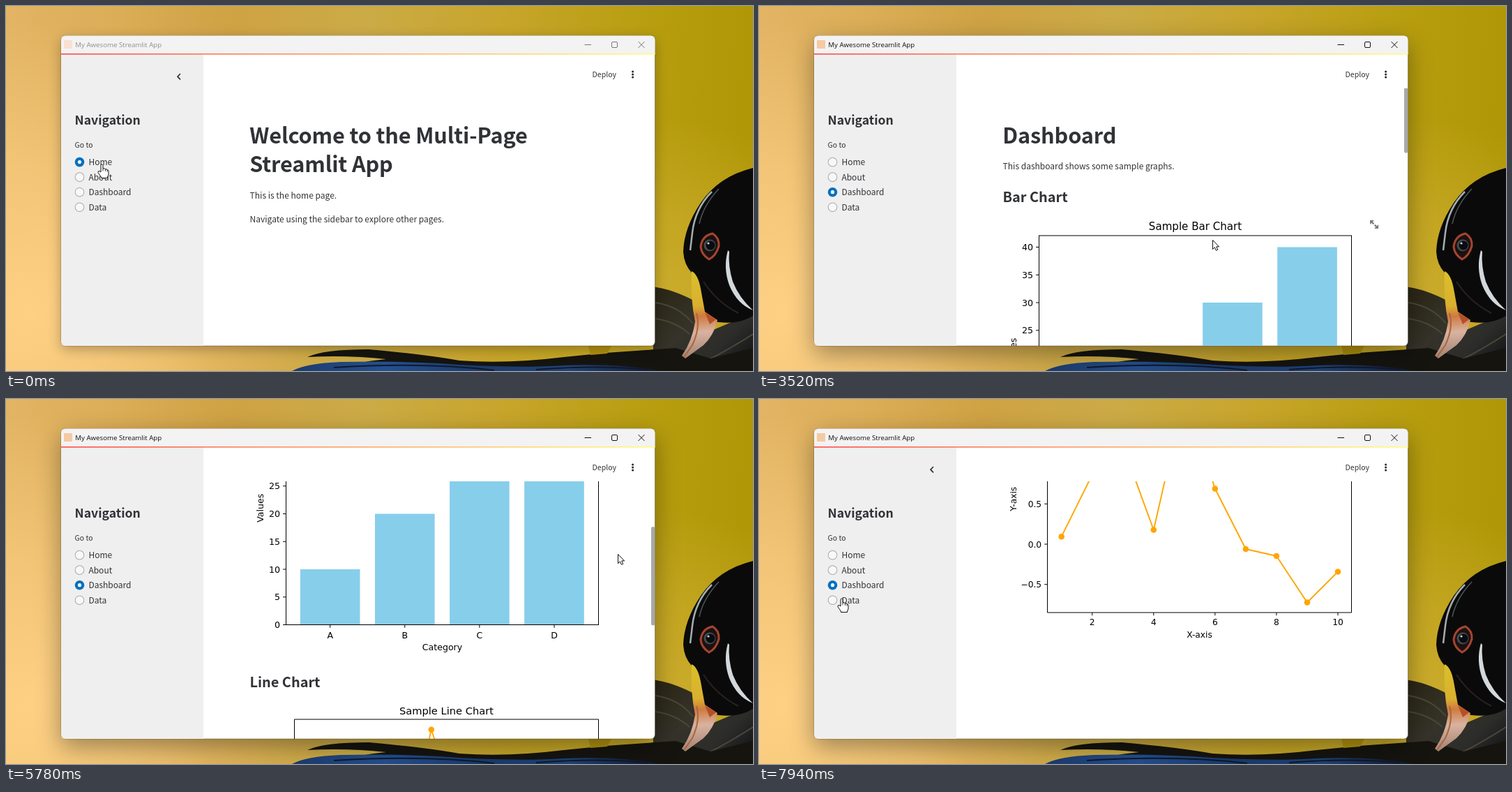
Write an HTML page with a canvas that moves like this. It is 1071 px wide and 523 px high and loops after 8000 ms.

```html
<!DOCTYPE html>
<html lang="en">
<head>
<meta charset="utf-8">
<title>Multi-page app</title>
<style>
  html, body { margin: 0; width: 100%; height: 100%; overflow: hidden; }
  canvas { display: block; }
</style>
</head>
<body>
<canvas id="stage" width="1071" height="523"></canvas>
<script>
const W = 1071, H = 523, LOOP = 8000;
const ctx = document.getElementById('stage').getContext('2d');
const UI = '"Noto Sans CJK JP", "Noto Sans CJK SC", "Noto Sans CJK", "Open Sans", sans-serif';
const PLOT = '"DejaVu Sans", sans-serif';
const INK = '#303236', BLUE = '#0070c0', SKY = '#87ceeb', ORANGE = '#ffa500';
const WIN = { x: 79, y: 42.5, w: 851.5, h: 444.5 };
const TOP = 69, SIDE = 283, VIEW = 118, BOTTOM = 487;

// [time, x, y] of the pointer tip
const POINTER = [
  [0, 138, 227], [330, 110, 219], [610, 132, 240], [1700, 132, 240],
  [1880, 140, 277], [2020, 140, 277], [2090, 141, 274], [2230, 141, 269],
  [3170, 141, 269], [3520, 650, 335], [3720, 650, 335], [4070, 658, 335],
  [4470, 856, 303], [4900, 925, 185], [5300, 930, 250], [5780, 877, 222],
  [6130, 877, 224], [6410, 878, 230], [7180, 878, 230], [7460, 122, 280],
  [7600, 122, 280], [7940, 119, 286]
];
// [time, offset]
const SCROLL = [[3660, 0], [4070, 239], [4400, 340], [5800, 340], [6410, 754], [6800, 818.5]];

const smooth = u => u * u * (3 - 2 * u);
const linear = u => u;

function track(keys, t, ease) {
  if (t <= keys[0][0]) return keys[0].slice(1);
  for (let i = 1; i < keys.length; i++) {
    const a = keys[i - 1], b = keys[i];
    if (t < b[0]) {
      const u = ease((t - a[0]) / (b[0] - a[0]));
      return a.slice(1).map((v, k) => v + (b[k + 1] - v) * u);
    }
  }
  return keys[keys.length - 1].slice(1);
}

function text(c, str, x, y, size, o = {}) {
  c.font = `${o.weight || 400} ${size}px ${o.family || UI}`;
  c.textAlign = o.align || 'left';
  c.textBaseline = 'alphabetic';
  c.letterSpacing = (o.spacing || 0) + 'px';
  c.fillStyle = o.color || INK;
  c.fillText(str, x, y);
}

function shape(c, d, fill, stroke, width = 1) {
  const p = new Path2D(d);
  if (fill) { c.fillStyle = fill; c.fill(p); }
  if (stroke) { c.strokeStyle = stroke; c.lineWidth = width; c.stroke(p); }
}

function disc(c, x, y, r, fill) {
  c.beginPath();
  c.arc(x, y, r, 0, 7);
  c.fillStyle = fill;
  c.fill();
}

function box(c, x, y, w, h, r) {
  c.beginPath();
  c.roundRect(x, y, w, h, r);
}

function gradient(c, x0, y0, x1, y1, stops) {
  const g = c.createLinearGradient(x0, y0, x1, y1);
  stops.forEach(([p, col]) => g.addColorStop(p, col));
  return g;
}

function glow(c, x, y, r, rgb, alpha) {
  const g = c.createRadialGradient(x, y, 0, x, y, r);
  g.addColorStop(0, `rgba(${rgb},${alpha})`);
  g.addColorStop(.5, `rgba(${rgb},${alpha * .6})`);
  g.addColorStop(1, `rgba(${rgb},0)`);
  c.fillStyle = g;
  c.fillRect(0, 0, W, H);
}

function drawDuck(c) {
  // back feathers
  shape(c, 'M925 402Q955 405 990 424L1000 470 1071 440V523H860L928 492Z',
    gradient(c, 930, 400, 1050, 523, [[0, '#2a2512'], [.45, '#35332a'], [.75, '#2c2c2a'], [1, '#141517']]));
  shape(c, 'M931 425Q965 430 985 455M931 448Q960 452 980 470M1005 508Q1040 490 1071 470',
    null, '#4a4738', 2);
  // tail and wing
  shape(c, 'M432 503Q455 492 520 492 600 499 650 508 720 513 800 503L860 497 960 490 1010 505 1071 490V523H470Q500 510 545 506 490 500 432 503Z', '#15140f');
  shape(c, 'M410 523Q430 512 480 510 570 508 650 514 740 519 800 515 880 512 940 523Z',
    gradient(c, 410, 0, 940, 0, [[0, '#1c3b6e'], [.25, '#24508f'], [.5, '#1a3a6c'], [.75, '#1e4276'], [1, '#10182a']]));
  shape(c, 'M470 518Q600 510 700 522M760 521Q850 514 920 521', null, '#10182a', 2);
  shape(c, 'M835 487H868L862 498 838 500Z', '#b3920f');
  // head
  shape(c, 'M1071 232Q1022 244 996 282 972 318 971 352 972 370 983 382L992 428 1008 450Q1045 460 1071 444Z', '#0b0a0b');
  shape(c, 'M1012 266Q988 290 984 325L981 350', null, '#a3aeb0', 2.5);
  shape(c, 'M1022 262Q1000 285 994 312', null, '#4c575a', 1.5);
  shape(c, 'M1035 350Q1028 375 1037 400 1048 427 1071 436 1051 418 1042 395 1035 372 1037 352Z', '#d3d9da');
  shape(c, 'M1000 395Q1020 425 1050 440', null, '#29221f', 2);
  // eye
  shape(c, 'M1013 326Q1023 332 1022 344 1018 358 1008 363 997 356 996 345 998 329 1013 326Z', '#1c1110', '#a4452f', 3);
  disc(c, 1009, 343, 8.5, '#434d50');
  disc(c, 1010, 343, 6.5, '#0a0b10');
  disc(c, 1007, 340, 1.6, '#c4d3da');
  // beak
  shape(c, 'M983 380Q992 384 996 405L1002 438 1020 450Q1015 472 1000 486L974 505 969 501Q984 480 988 452 981 420 983 380Z',
    gradient(c, 985, 380, 992, 505, [[0, '#d9c02a'], [.4, '#dab02f'], [.52, '#cf7a40'], [.7, '#d9b3a0'], [1, '#a08070']]));
  shape(c, 'M990 440Q996 460 984 486L972 503', null, '#a8663f', 2);
  shape(c, 'M1002 439L1018 449 1009 456Z', '#b55029');
}

function makeBackdrop() {
  const cv = document.createElement('canvas');
  cv.width = W;
  cv.height = H;
  const c = cv.getContext('2d');
  c.fillStyle = gradient(c, 0, 0, W, 60,
    [[0, '#e2b464'], [.14, '#dcae58'], [.3, '#cfa244'], [.48, '#cbab46'], [.66, '#c8a52c'], [.85, '#b89e10'], [1, '#af9706']]);
  c.fillRect(0, 0, W, H);
  glow(c, 30, 440, 420, '255,210,135', .95);
  glow(c, 950, 430, 270, '210,176,54', .8);
  drawDuck(c);
  return cv;
}
const backdrop = makeBackdrop();

function drawFrame(active) {
  const c = ctx;
  c.save();
  c.shadowColor = active ? 'rgba(0,0,0,.36)' : 'rgba(0,0,0,.28)';
  c.shadowBlur = active ? 34 : 18;
  c.shadowOffsetY = active ? 11 : 5;
  box(c, WIN.x, WIN.y, WIN.w, WIN.h, 6);
  c.fillStyle = '#fff';
  c.fill();
  c.restore();
  box(c, WIN.x, WIN.y, WIN.w, WIN.h, 6);
  c.strokeStyle = 'rgba(60,50,20,.4)';
  c.lineWidth = 1;
  c.stroke();
}

function drawTitleBar(active) {
  const c = ctx, ink = active ? '#111' : '#8f8f8f';
  c.fillStyle = '#f3f3f3';
  c.fillRect(79, 42, 852, 27);
  c.fillStyle = active ? '#f6c9a4' : '#fae0d2';
  c.fillRect(83, 49, 12, 12);
  text(c, 'My Awesome Streamlit App', 99.3, 58.8, 9.7, { family: '"Open Sans", "Noto Sans", sans-serif', color: ink });
  const line = active ? '#111' : '#777';
  shape(c, 'M829.5 55.5H839', null, line);
  box(c, 868.5, 51.5, 8, 8, 1.5);
  c.stroke();
  shape(c, 'M906.5 51L915.5 60M915.5 51L906.5 60', null, line);
  c.fillStyle = gradient(c, 79, 0, 931, 0, [[0, '#ff4b4b'], [1, '#fffd80']]);
  c.fillRect(79, 68, 852, 1.6);
}

function drawSidebar(choice, hover) {
  const c = ctx;
  c.fillStyle = '#efefef';
  c.fillRect(79, 69, SIDE - 79, 419);
  if (hover) shape(c, 'M250 97L246 101.2 250 105.4', null, INK, 1.7);
  text(c, 'Navigation', 98.5, 169.8, 17.6, { weight: 600 });
  text(c, 'Go to', 98.6, 203.4, 10.4);
  ['Home', 'About', 'Dashboard', 'Data'].forEach((label, i) => {
    const y = 223.6 + i * 21.55;
    if (i === choice) {
      disc(c, 105.5, y, 6.8, BLUE);
      disc(c, 105.5, y, 2.6, '#fff');
    } else {
      disc(c, 105.5, y, 6.8, '#a9a9ac');
      disc(c, 105.5, y, 5.8, '#f8f8f8');
    }
    text(c, label, 118.4, y + 4.7, 12);
  });
}

const title = (s, y) => text(ctx, s, 349.3, y, 30.7, { weight: 700, spacing: -.15 });
const heading = (s, y) => text(ctx, s, 349.5, y, 19.9, { weight: 600 });
const para = (s, y) => text(ctx, s, 349.6, y, 12.02);

function drawAxes(left, top, h, k, name, xName, yName, xTicks, yTicks) {
  const c = ctx, right = 849.5, bottom = top + h, size = 12.58 * k;
  const label = (s, x, y, align, px = size) => text(c, s, x, y, px, { family: PLOT, align, color: '#000' });
  c.strokeStyle = '#000';
  c.lineWidth = 1;
  c.strokeRect(left, top, right - left, h);
  c.beginPath();
  for (const [s, x] of xTicks) {
    c.moveTo(x, bottom);
    c.lineTo(x, bottom + 4.4 * k);
    label(s, x, bottom + 19 * k, 'center');
  }
  for (const [s, y] of yTicks) {
    c.moveTo(left, y);
    c.lineTo(left - 4.4 * k, y);
    label(s, left - 8.6 * k, y + 4.7 * k, 'right');
  }
  c.stroke();
  const mid = (left + right) / 2;
  label(name, mid, top - 7.6 * k, 'center', size * 1.2);
  label(xName, mid, bottom + 36.5 * k, 'center');
  c.save();
  c.translate(368.6, top + h / 2);
  c.rotate(-Math.PI / 2);
  label(yName, 0, 0, 'center');
  c.restore();
}

function drawBars(top) {
  const zero = top + 334.5, unit = 7.95;
  const mid = i => 464.7 + i * 107.1;
  ctx.fillStyle = SKY;
  for (let i = 0; i < 4; i++) {
    const h = (i + 1) * 10 * unit;
    ctx.fillRect(mid(i) - 42.8, zero - h, 85.6, h);
  }
  drawAxes(401.5, top, 334.5, 1, 'Sample Bar Chart', 'Category', 'Values',
    [...'ABCD'].map((s, i) => [s, mid(i)]),
    Array.from({ length: 9 }, (_, i) => [String(i * 5), zero - i * 5 * unit]));
}

function drawLine(top) {
  const h = 325.5, bottom = top + h;
  const rise = [108.8, 197.5, 239, 118.5, 310.7, 177.5, 91, 81, 14.5, 58.5];
  const pts = rise.map((r, i) => [433.7 + i * 44.03, bottom - r]);
  ctx.beginPath();
  pts.forEach(p => ctx.lineTo(...p));
  ctx.strokeStyle = ORANGE;
  ctx.lineWidth = 1.9;
  ctx.lineJoin = 'round';
  ctx.stroke();
  pts.forEach(p => disc(ctx, ...p, 4.3, ORANGE));
  const yTicks = [];
  for (let v = -.5; v <= 1.5; v += .5)
    yTicks.push([v.toFixed(1).replace('-', '\u2212'), bottom - 98 - v * 115.4]);
  drawAxes(413.5, top, h, .973, 'Sample Line Chart', 'X-axis', 'Y-axis',
    [2, 4, 6, 8, 10].map(n => [String(n), 433.7 + (n - 1) * 44.03]), yTicks);
}

function drawExpand(y) {
  ctx.save();
  ctx.translate(882, y);
  shape(ctx, 'M-6 -6H0L-6 0ZM6 6H0L6 0Z', '#7d7d80');
  shape(ctx, 'M-4.5 -4.5L-.6 -.6M4.5 4.5L.6 .6', null, '#7d7d80', 2.2);
  ctx.restore();
}

function drawDashboard(offset, charts, px, py) {
  title('Dashboard', 197 - offset);
  para('This dashboard shows some sample graphs.', 234.4 - offset);
  heading('Bar Chart', 280.8 - offset);
  if (!charts) return;
  drawBars(329 - offset);
  heading('Line Chart', 752.6 - offset);
  drawLine(799 - offset);
  const at = py + offset;
  if (px > 350 && px < 897) {
    if (at > 305 && at < 708) drawExpand(313 - offset);
    if (at > 775 && at < 1170) drawExpand(783 - offset);
  }
  if (px > SIDE) {
    box(ctx, 925, TOP + offset * .335, 5.2, 141.5, 2.6);
    ctx.fillStyle = '#a9a9a9';
    ctx.fill();
  }
}

function drawPage(t, px, py) {
  const c = ctx;
  c.save();
  c.beginPath();
  c.rect(SIDE, VIEW, 648, BOTTOM - VIEW);
  c.clip();
  if (t < 1210) {
    title('Welcome to the Multi-Page', 197);
    title('Streamlit App', 238);
    para('This is the home page.', 275.5);
    para('Navigate using the sidebar to explore other pages.', 309.8);
  } else if (t < 2570) {
    title('About', 197);
    para('This app demonstrates a multi-page Streamlit application.', 234.4);
    para('You can switch between Home, About, and Dashboard pages using the sidebar.', 268.8);
  } else {
    drawDashboard(track(SCROLL, t, linear)[0], t >= 3030, px, py);
  }
  c.restore();
  text(c, 'Deploy', 840.6, 102.1, 10.5);
  [94, 98, 102].forEach(y => disc(c, 898.6, y, 1.6, INK));
}

function drawPointer(x, y) {
  const c = ctx, hand = x < 185 && y > 212 && y < 302;
  c.save();
  c.translate(x, y);
  c.lineJoin = 'round';
  if (hand) {
    shape(c, 'M-2 11V1.5Q-2 0-.5 0 1 0 1 1.5V6Q4 5 4.5 7 7 6 7.2 8 9 7.5 9 9.5V14Q9 16 7.5 18V19.5H-1.5V18Q-4 15-6 11.5-6 9-4 9.5Z', '#fff', '#111');
    shape(c, 'M1 6V9.5M4.5 7V10M7.2 8V10.5', null, '#111', .8);
  } else {
    shape(c, 'M.5 .5V13.6L3.4 10.8 5.4 15.3 7.7 14.3 5.8 9.9H9.6Z', '#fff', '#111');
  }
  c.restore();
}

function render(t) {
  const [px, py] = track(POINTER, t, smooth);
  const active = t >= 1070;
  const choice = t < 1070 ? 0 : t < 2430 ? 1 : 2;
  ctx.drawImage(backdrop, 0, 0);
  drawFrame(active);
  ctx.save();
  box(ctx, WIN.x, WIN.y, WIN.w, WIN.h, 6);
  ctx.clip();
  drawPage(t, px, py);
  drawSidebar(choice, px < SIDE);
  drawTitleBar(active);
  ctx.restore();
  drawPointer(px, py);
}

const start = performance.now();
function tick() {
  render((performance.now() - start) % LOOP);
  requestAnimationFrame(tick);
}
tick();
</script>
</body>
</html>
```
